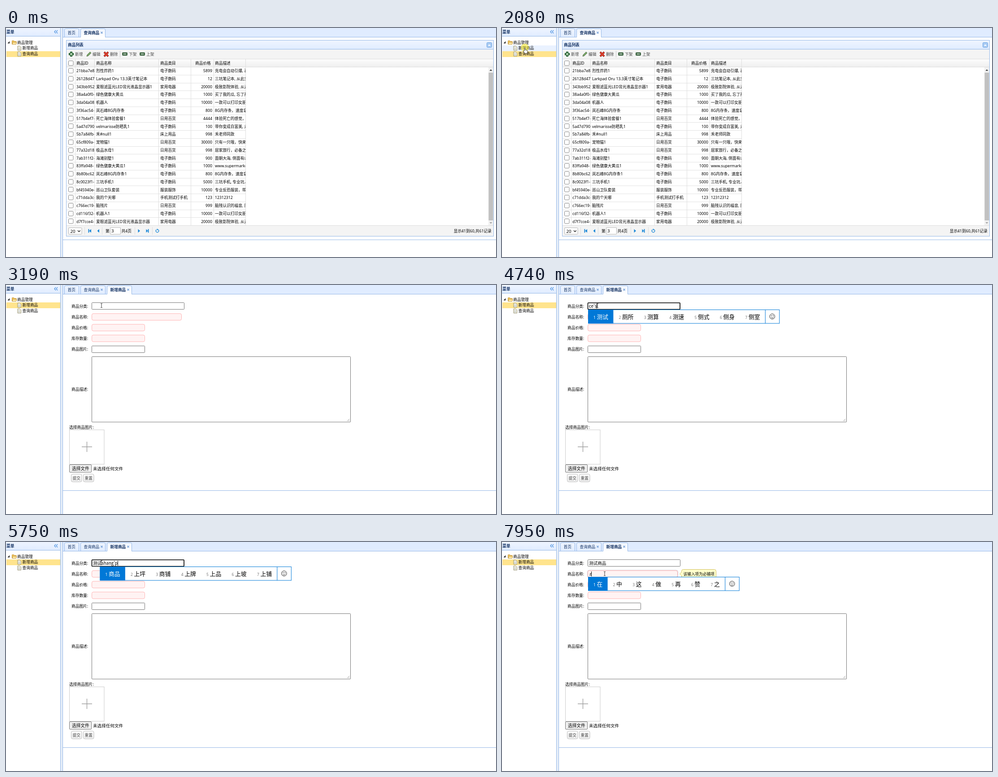
An HTML page that plays this animation: 1093x513 px, repeating every 8 s.

```html
<!DOCTYPE html>
<html lang="zh-CN">
<head>
<meta charset="utf-8">
<style>
html, body { margin: 0; width: 100%; height: 100%; overflow: hidden; background: #fff; }
svg { display: block; font-family: "Noto Sans", "Noto Sans CJK SC", sans-serif; }
.b { font-weight: 700; }
.typed { font-family: "Noto Sans CJK SC", sans-serif; }
</style>
</head>
<body>
<svg width="1093" height="513" viewBox="0 0 1093 513">
  <defs>
    <linearGradient id="head" x2="0" y2="1"><stop stop-color="#eff5ff"/><stop offset="1" stop-color="#e0ecff"/></linearGradient>
    <linearGradient id="open" x2="0" y2="1"><stop stop-color="#eff5ff"/><stop offset="1" stop-color="#fff"/></linearGradient>
    <linearGradient id="gray" x2="0" y2="1"><stop stop-color="#fcfcfc"/><stop offset="1" stop-color="#efefef"/></linearGradient>
  </defs>
  <g id="frame"></g><g id="grid"></g><g id="form"></g><g id="live"></g>
</svg>
<script>
const LOOP = 8000, EDGE = '#95b8e7', NAVY = '#0e2d5f', BLUE = '#1a87d7', IME = '#0078d7';
const $ = id => document.getElementById(id);

const rect = (x, y, w, h, fill, stroke = 'none', more = '') =>
  `<rect x="${x}" y="${y}" width="${w}" height="${h}" fill="${fill}" stroke="${stroke}" ${more}/>`;
const path = (d, fill, stroke = 'none', more = '') =>
  `<path d="${d}" fill="${fill}" stroke="${stroke}" ${more}/>`;
const line = (d, color, width = 1) => path(d, 'none', color, `stroke-width="${width}"`);
const circle = (x, y, r, fill, stroke = 'none', more = '') =>
  `<circle cx="${x}" cy="${y}" r="${r}" fill="${fill}" stroke="${stroke}" ${more}/>`;
// Text is centred vertically on cy.
const text = (x, cy, s, size = 8.7, fill = '#000', more = '') =>
  `<text x="${x}" y="${cy + size * .37}" font-size="${size}" fill="${fill}" ${more}>${s}</text>`;

function frame() {
  return rect(0, 0, 121, 18, 'url(#head)') + line('M0 18.5H121', EDGE) +
    text(1, 9, '菜单', 8.7, NAVY, 'class="b"') +
    line('M111 5l-3 3.5 3 3.5M115 5l-3 3.5 3 3.5', '#4a90e0', 1.2) +
    rect(122, 0, 4, 513, '#e6eef8') + line('M121.5 0V513M126.5 0V513', EDGE) +
    rect(127, 0, 966, 20, '#e0ecff') + line('M127 20.5H1093', EDGE);
}

const doc = y => path(`M26 ${y - 4.5}h5l2.5 2.5v7h-7.5z`, '#fbf8e6', '#8a8464', 'stroke-width=".9"') +
  line(`M27.5 ${y - 1}h4M27.5 ${y + 1}h4M27.5 ${y + 3}h4`, '#8d9db5', .7);

function menu(added, hover) {
  return (hover ? rect(1, 39, 120, 13, '#eaf2ff') : '') +
    rect(1, added ? 39 : 52, 120, 13, '#ffe48d') +
    path('M8 29.5V34.5H3.5z', '#222') +
    path('M13.5 36V28.5h4l1 1.5h4.5v6z', '#f3c65b', '#b88a2b', 'stroke-width=".8"') +
    path('M13.5 36.5l2-4.5h8.5l-1.5 4.5z', '#ffe9a6', '#b88a2b', 'stroke-width=".8"') +
    text(25, 32.5, '商品管理') + doc(45) + text(36.5, 45, '新增商品') + doc(58) + text(36.5, 58, '查询商品');
}

function tab(x, w, title, open, closable) {
  return path(`M${x + .5} 20.5V4.5q0-3 3-3h${w - 6}q3 0 3 3V20.5`, open ? 'url(#open)' : 'url(#head)', EDGE) +
    (open ? line(`M${x + 1} 20.5h${w - 1}`, '#fff') : line(`M${x} 20.5h${w}`, EDGE)) +
    text(x + 7.5, 10.5, title, 8.7, NAVY, open ? 'class="b"' : '') +
    (closable ? line(`M${x + 45.5} 8.5l4 4m0-4l-4 4`, '#6f9bd4', 1.2) : '');
}

const tabs = added => tab(130, 32, '首页') + tab(166, 55, '查询商品', !added, true) +
  (added ? tab(225, 55, '新增商品', true, true) : '') +
  line(added ? 'M127 460.5H1093' : 'M127 474.5H1093', EDGE);

const goods = `21bba7e8|烈性炸药1|电子数码|5899|充电会自动引爆, 再也
26128d47|Larkpad Oru 13.3英寸笔记本|电子数码|12|三坑笔记本, 从此变
343bb952|爱眼滤蓝光LED背光液晶显示器1|家用电器|20000|极致影院体验, 从这
38a4a0f0|绿色健康大黄瓜|电子数码|1000|买了我的瓜, 忘了那
3da04a08|机器人|电子数码|10000|一款可以打印女朋
3f36ac54|岚石峰8G内存条|电子数码|800|8G内存条，速度拿
517b4ef7|死亡海体验套餐1|日用百货|4444|体验死亡的感觉，
5a47d790|velmarisse防晒乳1|电子数码|100|带你变成白富美, 走
5b7a84fb|禾#null1|床上用品|998|禾老师同款
65cf809a|宠物猫1|日用百货|30000|只有一只哦，快来
77a32d18|极品水母1|日用百货|998|居家旅行，必备之
7ab311f2|海滩别墅1|电子数码|900|面朝大海, 侧面有山
83ffa948|绿色健康大黄瓜1|电子数码|1000|www.supermarket
8b80bc62|岚石峰8G内存条1|电子数码|800|8G内存条，速度拿
8c0023f1|三坑手机1|电子数码|5000|三坑手机, 专业坑人
bf45940e|巡山卫队套装|服装服饰|10000|专业反恐服装，带
c71dda3c|我的个天哪|手机测试打手机|123|12312312
c766ec19|脑残片|日用百货|999|脑残认识的福音, 服
cd116f32|机器人1|电子数码|10000|一款可以打印女朋
d7f7cce4|爱眼滤蓝光LED背光液晶显示器|家用电器|20000|极致影院体验, 从这`.split('\n').map(r => r.split('|'));

const check = y => rect(139.5, Math.round(y - 6) + .5, 10.5, 10.5, '#fff', '#848484', 'rx="1.8"');

function toolbar() {
  const label = (x, s) => text(x, 58.5, s, 8.7, '#444');
  const minus = x => rect(x, 55, 11, 6.5, '#2f5e35', '#1d3d22', 'rx="1" stroke-width=".5"') + rect(x + 2, 57.5, 7, 1.6, '#fff');
  return rect(135, 48, 952, 21, '#f4f4f4') + line('M135 69.5H1087', '#ddd') +
    line('M145.5 53V64M140 58.5H151', '#1f5a2a', 5) + line('M145.5 55V62M142 58.5H149', '#d6f0d2', 1.6) +
    path('M180 63.5l1-3.5 6.5-6.5 2.5 2.5-6.5 6.5z', '#79a866', '#4c5f43', 'stroke-width=".8"') +
    line('M219 54l9 9.5m0-9.5l-9 9.5', '#8d1a12', 4) + line('M219.5 54.5l8 8.5m0-8.5l-8 8.5', '#e8402c', 2.4) +
    line('M254.5 51V66', '#ccc') + minus(259.5) + minus(298.5) +
    label(154, '新增') + label(193, '编辑') + label(232, '删除') + label(274, '下架') + label(313, '上架');
}

function table() {
  const pitch = 17.76, cols = [201, 344, 460, 466];
  const at = i => 96 + i * pitch;
  let out = rect(135, 70, 952, 17, 'url(#gray)') + line('M135 87.5H1087', '#ddd');
  out += goods.map((g, i) => check(at(i)) + text(157, at(i), g[0] + '-')).join('') + rect(197, 88, 338, 354, '#fff');
  goods.forEach((g, i) => {
    out += cols.map((x, c) => text(x, at(i), g[c + 1], 8.7, '#000', c == 2 ? 'text-anchor="end"' : '')).join('');
  });
  out += rect(535, 88, 541, 354, '#fff') + check(78.5);
  [[157, '商品ID'], [201, '商品名称'], [344, '商品类目'], [422, '商品价格'], [466, '商品描述']]
    .forEach(([x, s]) => out += text(x, 78.5, s));
  for (let i = 1; i < 20; i++) out += line(`M135 ${Math.round(87 + i * pitch) + .5}H535`, '#e2e2e2');
  [154, 197, 340, 412, 463, 534].forEach(x => out += line(`M${x + .5} 70V442`, '#dedede'));
  return out + rect(1076, 88, 11, 354, '#f1f1f1') + rect(1076.5, 100, 10, 331, '#c1c1c1') +
    path('M1078.5 96l3-3.5 3 3.5z', '#444') + path('M1078.5 435l3 3.5 3-3.5z', '#a3a3a3');
}

function pager() {
  return rect(135, 443, 952, 23, '#f4f4f4') + line('M135 442.5H1087', '#ddd') +
    rect(139.5, 447.5, 29.5, 14.5, '#fff', '#b4b4b4', 'rx="1.5"') + text(143.5, 455, '20', 9.7) +
    line('M160 453.5l2.8 3 2.8-3', '#222', 1.4) +
    line('M175.5 446V463M214.5 446V463M287.5 446V463M326.5 446V463', '#ddd') +
    path('M183.5 450.5h2v8h-2zM190 450.5v8l-4.5-4zM208 450.5v8l-4.5-4zM294.5 450.5v8l4.5-4zM312.5 450.5v8l4-4zM316.5 450.5h2v8h-2z', BLUE) +
    line('M339.5 451.8a3.3 3.3 0 1 1-4 0', BLUE, 1.4) + path('M336.5 449.5l3.5 1.8-3 2.2z', BLUE) +
    text(222, 455, '第') + rect(232.5, 447, 23, 15, '#fff', '#b4b4b4', 'rx="1"') + text(235, 454.5, '3', 9.7) +
    text(257.5, 455, '共4页') + text(1083, 455, '显示41到60,共61记录', 8.7, '#000', 'text-anchor="end"');
}

function grid() {
  return rect(134.5, 27.5, 953, 439, '#fff', EDGE) + rect(135, 28, 952, 19, 'url(#head)') + line('M135 47.5H1087', EDGE) +
    text(138, 38, '商品列表', 8.7, NAVY, 'class="b"') +
    rect(1072.5, 32.5, 11, 11, '#a9cbf3', '#6ea4e2', 'rx="2"') + path('M1075 40l3-3.5 3 3.5z', '#fff') +
    toolbar() + table() + pager();
}

const pink = (y, w) => rect(191.5, y, w, 15, '#fff3f3', '#ffb3b3', 'rx="3.5"');
const button = (x, s) => rect(x + .5, 423.5, 23.5, 17.5, 'url(#gray)', '#bbb', 'rx="3.5"') + text(x + 3.5, 432.5, s, 8.7, '#444');

function form() {
  const labels = [['商品分类:', 48], ['商品名称:', 72], ['商品价格:', 96], ['库存数量:', 120], ['商品图片:', 144], ['商品描述:', 234]];
  return labels.map(([s, y]) => text(146, y, s)).join('') +
    rect(191.5, 39.5, 206, 15, '#fff', '#767676', 'rx="1"') +
    pink(64, 200) + pink(88, 118) + pink(112, 118) +
    rect(191.5, 136.5, 118, 15, '#fff', '#767676', 'rx="1"') +
    rect(191.5, 160.5, 577, 146.5, '#fff', '#767676', 'rx="1"') + line('M761 305l5-5M764 305l2-2', '#888', .8) +
    text(141, 318.5, '选择商品图片:') + rect(141.5, 324.5, 77.5, 77, '#fff', '#ccc') +
    line('M180.5 351V374M169 362.5H192', '#a0a0a0', 1.4) +
    rect(141.5, 402.5, 49, 17, '#efefef', '#767676', 'rx="1.5"') + text(147, 411, '选择文件', 9.7) + text(194, 411, '未选择任何文件', 9.6) +
    button(145, '提交') + button(172, '重置');
}

// Typing log: time, committed text, letters being composed, candidates.
const pairs = '测试 厕所 测算 测速 侧式 侧身 侧室', wares = '商品 上坪 商铺 上牌 上品 上坡 上铺', is = '是 说 上 时 所 使 四';
const keys = [
  [3270, '', ''], [4250, '', 'c'], [4330, '', 'c', '才 从 出 次 成 吃 车'], [4570, '', 'ce', '测 侧 策 册 厕 恻 撤'],
  [4740, '', "ce's", pairs], [4810, '', "ce'sh", pairs], [4880, '', "ce'shi", pairs], [4960, '测试', ''],
  [5210, '测试', 's', is], [5290, '测试', 'sh', is], [5380, '测试', 'sha', '啥 杀 沙 傻 莎 煞 厦'],
  [5540, '测试', 'shan', '山 闪 善 陕 扇 衫 删'], [5600, '测试', 'shang', '上 商 尚 伤 赏 裳 熵'],
  [5750, '测试', "shang'p", wares], [5830, '测试', "shang'pi", wares], [5910, '测试', "shang'pin", wares],
  [6140, '测试商品', ''], [7080, '', ''], [7950, '', 'z', '在 中 这 做 再 赞 之']
];

function candidates(x, y, list) {
  const words = list.split(' '), cell = 30.8 + 12.8 * words[0].length, end = x + 7 * cell;
  return rect(x + .5, y + .5, 7 * cell + 31.5, 30.5, '#fff', IME) + rect(x, y, cell, 31, IME) +
    words.map((w, i) => text(x + i * cell + 12, y + 17.5, i + 1, 8.5, i ? '#777' : '#fff') +
      text(x + i * cell + 19.5, y + 16.5, w, 12.8, i ? '#000' : '#fff')).join('') +
    line(`M${end + .5} ${y}v31`, IME) + circle(end + 16, y + 15.5, 5.8, 'none', '#222') +
    circle(end + 14, y + 14, .9, '#222') + circle(end + 18, y + 14, .9, '#222') +
    line(`M${end + 13} ${y + 17}q3 3.5 6 0`, '#222');
}

// Pointer route: time, x, y; it advances in coarse steps.
const route = [
  [760, 550, 30], [1000, 250, 98], [1220, 54, 96], [1300, 54, 96], [1850, 51, 44], [2400, 51, 44],
  [2640, 130, 52], [2870, 170, 74], [3190, 213, 46], [6530, 213, 46], [6840, 229, 71], [LOOP, 229, 71]
];
function pointerAt(t) {
  const i = route.findIndex(p => p[0] > t), [t0, x0, y0] = route[i - 1], [t1, x1, y1] = route[i];
  const n = Math.round((t1 - t0) / 78), u = Math.floor((t - t0) / (t1 - t0) * n) / n;
  return [x0 + (x1 - x0) * u, y0 + (y1 - y0) * u];
}

function pointer(x, y, added) {
  const inField = added && x > 191 && x < 392 && (y > 39 && y < 55 || y > 64 && y < 80);
  if (inField) return line(`M${x - 2} ${y - 4.5}h1.5l.5.5.5-.5h1.5M${x} ${y - 4}v8M${x - 2} ${y + 4.5}h1.5l.5-.5.5.5h1.5`, '#222', .9);
  const hand = x < 121 && y > 26 && y < 64;
  const shape = hand
    ? 'v-6q1-1.5 2 0v4l4 1q1.5.5 1 2.5l-1 4.5h-5l-3.5-5q0-1.5 1.5-.5z'
    : 'v11l2.5-2.3 1.8 4 1.7-.8-1.7-3.8h3.4z';
  return path(`M${hand ? x - 1 : x} ${hand ? y + 7 : y}${shape}`, '#fff', '#222', 'stroke-width=".8" stroke-linejoin="round"');
}

const pen = document.createElement('canvas').getContext('2d');
const widthOf = (s, size) => (pen.font = `${size}px "Noto Sans CJK SC", sans-serif`, pen.measureText(s).width);

function fields(t, y) {
  const second = t >= 7080, size = second ? 8.7 : 9.6, x = second ? 195 : 194, cy = second ? 71.5 : 47.5;
  let out = '';
  if (second) {
    out += text(194, 47.5, '测试商品', 9.6, '#000', 'class="typed"') +
      rect(190.5, 63, 202, 17, 'none', '#cfd3dc', 'rx="4"') + pink(64, 200);
  } else if (t >= 3270) out += rect(191.5, 40, 205.5, 14.5, '#fff', '#101010', 'rx="1.5" stroke-width="1.7"');
  if (y > 63 && t > 6600) {
    out += rect(400.5, 61.5, 77, 19.5, '#ffffcc', '#d2bf5c', 'rx="4"') +
      path('M401 67l-4.5 4.5 4.5 4.5', '#ffffcc', '#d2bf5c') + text(404.5, 72, '该输入项为必输项');
  }
  const key = keys.findLast(k => k[0] <= t);
  if (!key) return out;
  const [since, done, letters, list] = key, s = done + letters;
  out += text(x, cy, s, size, '#000', 'class="typed"');
  if ((t - since) % 1060 < 530) out += line(`M${Math.round(x + widthOf(s, size)) + .5} ${cy - 5.5}v11`, '#000');
  if (list) out += candidates(done ? 209.5 : 192, second ? 78 : 55, list);
  return out;
}

const clicks = [[2080, 2160], [3270, 3330], [7080, 7160]];
let last;

function draw() {
  const t = performance.now() % LOOP, added = t >= 2160, moving = t >= 760;
  const [x, y] = moving ? pointerAt(t) : [0, 0];
  const hover = !added && moving && x < 121 && y > 39 && y < 52;
  let out = menu(added, hover) + tabs(added);
  if (added) out += fields(t, y);
  if (clicks.some(([a, b]) => t >= a && t < b)) out += circle(x, y, 9, '#ffee20', 'none', 'opacity=".55"');
  if (moving) out += pointer(x, y, added);
  if (out !== last) $('live').innerHTML = last = out;
  $('grid').style.display = added ? 'none' : '';
  $('form').style.display = t >= 2240 ? '' : 'none';
  requestAnimationFrame(draw);
}

$('frame').innerHTML = frame();
$('grid').innerHTML = grid();
$('form').innerHTML = form();
draw();
</script>
</body>
</html>
```
